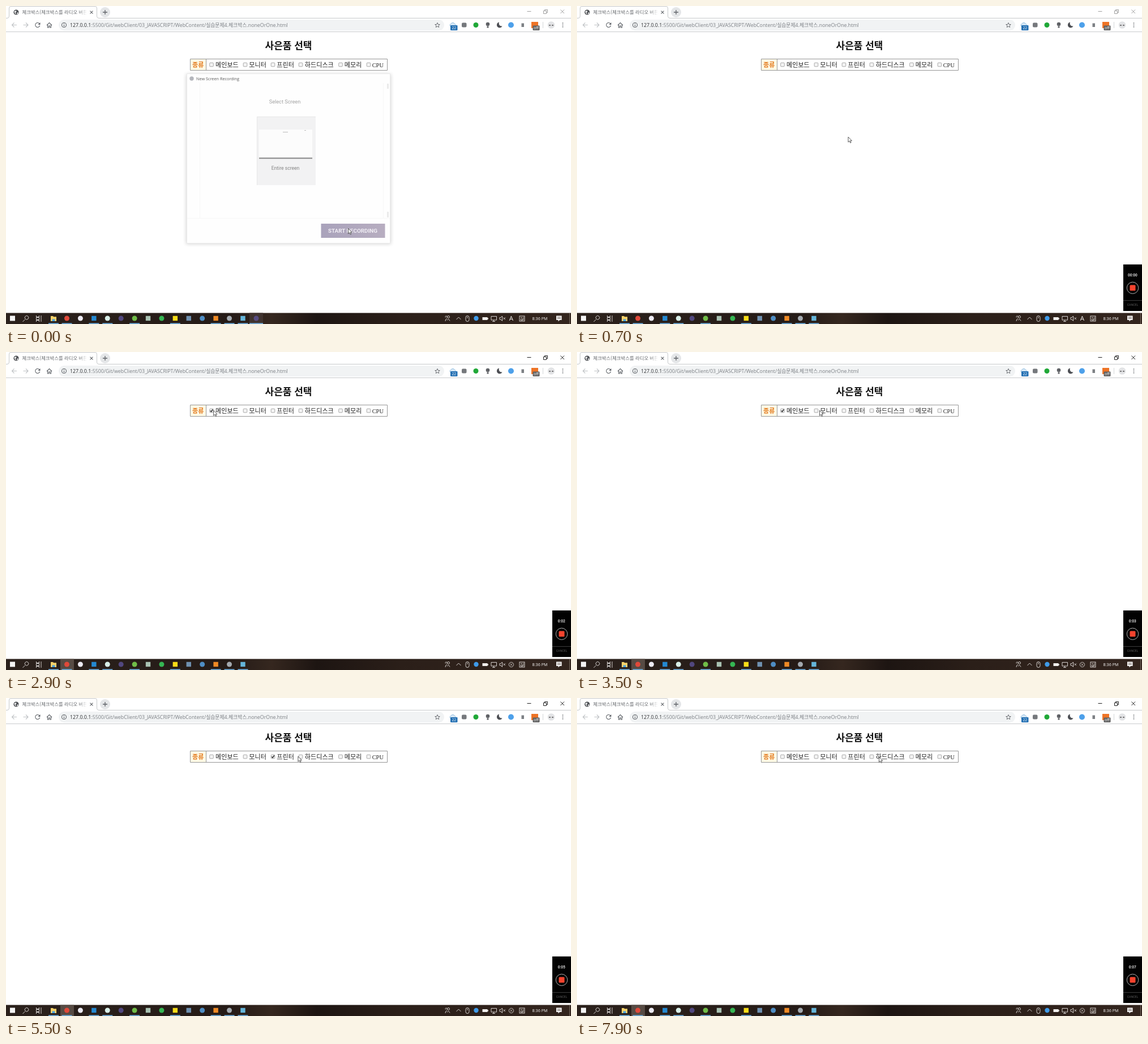
An HTML page for the animation above (8 s loop, 998 by 561 pixels).

```html
<!DOCTYPE html>
<html lang="ko">
<head>
<meta charset="utf-8">
<title>사은품 선택</title>
<style>
html, body { margin: 0; width: 100%; height: 100%; overflow: hidden; background: #fff; }
svg { display: block; width: 100vw; height: 100vh; }
text { font-family: 'Open Sans', 'Noto Sans CJK KR', 'Noto Sans CJK', sans-serif; white-space: pre; }
.ko { font-family: 'Noto Sans CJK KR', 'Noto Sans CJK', sans-serif; }
.ro { font-family: Roboto, sans-serif; }
.mid { text-anchor: middle; }
.ln { fill: none; stroke: #5f6368; stroke-width: 1.1; }
.tray { fill: none; stroke: #e6e3e0; stroke-width: .9; }
.win { fill: none; stroke: #a0a0a0; stroke-width: 1; }
.focus .win { stroke: #222; }
.focus .ime, .blur .no { display: none; }
.blur .active { display: none; }
</style>
</head>
<body>
<svg id="stage" class="blur" viewBox="0 0 998 561" preserveAspectRatio="none">
  <defs>
    <linearGradient id="bar">
      <stop offset="0" stop-color="#2b211c"/><stop offset=".4" stop-color="#251b17"/>
      <stop offset=".47" stop-color="#35271f"/><stop offset=".55" stop-color="#1d1512"/>
      <stop offset=".7" stop-color="#2b1f19"/><stop offset="1" stop-color="#33251e"/>
    </linearGradient>
    <linearGradient id="btn">
      <stop offset="0" stop-color="#a9a2bb"/><stop offset="1" stop-color="#b7adc0"/>
    </linearGradient>
    <linearGradient id="fade">
      <stop offset="0" stop-color="#fff" stop-opacity="0"/><stop offset="1" stop-color="#fff"/>
    </linearGradient>
    <clipPath id="tab"><path d="M27 3h116v16H27z"/></clipPath>
    <filter id="soft" x="-10%" y="-10%" width="120%" height="120%"><feGaussianBlur stdDeviation="3"/></filter>
  </defs>
  <rect width="998" height="561" fill="#fff"/>

  <!-- tab strip -->
  <path d="M0 21.5H2Q5.500 21.500 5.500 18V4Q5.500 .5 9 .5H157Q160.500 .5 160.500 4V18Q160.500 21.500 164 21.500H998" fill="none" stroke="#c6c8ca"/>
  <circle cx="18" cy="11" r="4.600" fill="#505357"/>
  <path d="M14.500 9.500l3-1.500 1 2-2 1 1 2-1 1.500zM19.500 12l2-1-.5 3-1.500.8z" fill="#fff"/>
  <g clip-path="url(#tab)"><text class="ko" x="28.500" y="13.700" font-size="8.400" fill="#66696d">체크박스(체크박스를 라디오 버튼</text></g>
  <rect x="128" y="4" width="15" height="14" fill="url(#fade)"/>
  <path class="ln" d="M148.500 8.700l5 5m0-5l-5 5"/>
  <circle cx="175" cy="11" r="9" fill="#e4e6e8"/>
  <path class="ln" d="M171 11h8m-4-4v8" style="stroke-width:1.300"/>
  <path class="win" d="M920.500 9.500h7"/>
  <path class="win" d="M949.500 8.500h5v5h-5zM951.500 8.500v-2h5v5h-2"/>
  <path class="win" d="M979.500 6.500l6.500 6.500m0-6.500l-6.500 6.500"/>

  <!-- toolbar -->
  <path d="M0 45.500H998" stroke="#c9cbcd"/>
  <rect x="93" y="24" width="681" height="19.500" rx="9.700" fill="#f1f3f4"/>
  <path class="ln" d="M19 33.500h-8.500m4-4l-4 4 4 4M30.500 33.500h8.500m-4-4l4 4-4 4" style="stroke:#bfc2c5"/>
  <path class="ln" d="M59.300 31.500a4 4 0 1 0 .4 3"/>
  <path d="M60.500 29v4h-4z" fill="#5f6368"/>
  <path class="ln" d="M72 34l4.500-4.500L81 34M73.500 33v5h2v-3h2v3h2v-5"/>
  <circle class="ln" cx="102.500" cy="33.500" r="4"/>
  <path class="ln" d="M102.500 33v3m0-5.200v1.100"/>
  <text x="113" y="37" font-size="8.820" fill="#7b7f84"><tspan fill="#2c2e31">127.0.0.1</tspan>:5500/Git/webClient/03_JAVASCRIPT/WebContent/실습문제4.체크박스.noneOrOne.html</text>
  <path class="ln" d="M762 29.500l1.200 2.900 3.100.2-2.400 2 .8 3-2.700-1.700-2.700 1.700.8-3-2.400-2 3.100-.2z" style="stroke-width:.9"/>
  <path d="M785 36a2.500 2.500 0 0 1 1-4.500 3.500 3.500 0 0 1 6.500 0 2.500 2.500 0 0 1 1 4.500z" fill="#d5e7f5" stroke="#8ab8dc" stroke-width=".8"/>
  <rect x="785" y="34" width="12.500" height="9" rx="1" fill="#2470b3"/>
  <text class="mid" x="791.200" y="41" font-size="6.600" fill="#fff">22</text>
  <rect x="805" y="29.500" width="8.500" height="8" rx="2" fill="#75787c"/>
  <circle cx="830" cy="33.500" r="4.500" fill="#20a838"/>
  <circle cx="851" cy="32" r="3.300" fill="#606266"/>
  <path d="M849.500 35.500h3v3h-3z" fill="#606266"/>
  <path d="M871 28.500a5 5 0 1 0 5.500 7 5 5 0 0 1-5.500-7z" fill="#4c4e53"/>
  <circle cx="892" cy="33.500" r="5" fill="#4da0ea"/>
  <rect x="910.500" y="30.500" width="4.500" height="6.500" fill="#7d8084"/>
  <rect x="928" y="28" width="12" height="11" fill="#ee7426"/>
  <rect x="930.500" y="34.500" width="12" height="8.500" rx="1" fill="#626262"/>
  <text class="mid" x="936.500" y="41.200" font-size="6.600" fill="#fff">off</text>
  <path d="M948.500 28v11" stroke="#d4d6d8"/>
  <circle cx="963" cy="33.500" r="6.300" fill="#e2e3e5"/>
  <path d="M959 34h3m2 0h3" stroke="#5a5a5a" stroke-width="1.600"/>
  <path d="M983.500 29.500v1.500m0 1.800v1.500m0 1.800v1.500" stroke="#5f6368" stroke-width="1.600"/>

  <!-- page -->
  <text class="ko mid" x="499" y="76.300" font-size="17" font-weight="700" fill="#111">사은품 선택</text>
  <rect x="325.500" y="93.500" width="28" height="20" fill="#fffbe6"/>
  <path d="M325.500 93.500H673.500V113.500H325.500zM353.500 93.500V113.500" fill="none" stroke="#969696"/>
  <text class="ko mid" x="339.200" y="107.700" font-size="11" font-weight="700" fill="#e2781a">종류</text>
  <g id="items"></g>

  <!-- recording dialog -->
  <g id="dialog">
    <rect x="318" y="120" width="362" height="300" fill="#000" opacity=".16" filter="url(#soft)"/>
    <rect x="319.500" y="119.500" width="359" height="299" fill="#fefefe" stroke="#eaeaea"/>
    <path d="M320 374.500H678M342.500 136V374M666.500 136V374" stroke="#f7f7f7"/>
    <path d="M674.500 137v9m0 217v10" stroke="#eaeaea" stroke-width="3"/>
    <circle cx="328" cy="128" r="3.700" fill="#b4b6bc"/>
    <text x="336" y="130.600" font-size="7.300" fill="#5a5a5a">New Screen Recording</text>
    <text class="ro mid" x="492.500" y="171.500" font-size="9.200" fill="#a2a2a2">Select Screen</text>
    <rect x="443" y="195" width="104" height="121" fill="#f2f2f3"/>
    <path d="M443.500 316V195.500H547" fill="none" stroke="#e6e6e7"/>
    <rect x="447" y="218" width="94" height="50" fill="#fcfcfc"/>
    <path d="M447 268.500h94" stroke="#858585" stroke-width="2.200"/>
    <path d="M489 222.500h9m29-3h3" stroke="#bbb"/>
    <text class="ro mid" x="493.500" y="289" font-size="8.600" fill="#858585">Entire screen</text>
    <rect x="556.500" y="384" width="113" height="25" fill="url(#btn)"/>
    <text class="ro mid" x="612.500" y="400" font-size="9.900" font-weight="700" fill="#f1eef5">START RECORDING</text>
  </g>

  <!-- recorder -->
  <g id="recorder">
    <rect x="964.500" y="455.500" width="34" height="83" fill="#000" opacity=".12"/>
    <rect x="965" y="456" width="33" height="82" fill="#020202"/>
    <text id="clock" class="ro mid" x="981.300" y="476.800" font-size="6.600" font-weight="500" fill="#fff"></text>
    <circle cx="981.500" cy="497.300" r="10.200" fill="none" stroke="#c4c4c4" stroke-width=".9"/>
    <rect x="976.500" y="492.300" width="10" height="10" rx="1.500" fill="#f4442e"/>
    <path d="M965 519.500h33" stroke="#3c3c3c"/>
    <text class="ro mid" x="981.500" y="529" font-size="5.200" fill="#5c5c5c">CANCEL</text>
  </g>

  <!-- taskbar -->
  <rect y="541.500" width="998" height="19.500" fill="url(#bar)"/>
  <rect class="active" x="96" y="541.500" width="24" height="19.500" fill="#574b44"/>
  <rect x="7" y="546.500" width="9" height="9" fill="#f4f4f4"/>
  <path class="tray" d="M33.500 553l-4 4M38.900 552.100a3.300 3.300 0 1 1 0-4.600 3.300 3.300 0 0 1 0 4.600"/>
  <path class="tray" d="M53.500 546v2.500h5V546M53.500 557v-2.500h5v2.500M53.500 549.500h5v4h-5zM62 546v11"/>
  <path d="M79 547h4l1 1.300h5V556H79z" fill="#f6d26b"/>
  <path d="M81.500 552.500h5V556h-5z" fill="#4aa3df"/>
  <g id="apps"></g>
  <g id="recApp">
    <rect x="430" y="541.500" width="24" height="19.500" fill="#40332f"/>
    <circle cx="442" cy="551" r="4.500" fill="#574c82"/>
    <path d="M430 560.200h24" stroke="#78b8ea" stroke-width="1.600"/>
  </g>

  <g class="tray">
    <circle cx="781.500" cy="548.500" r="2"/>
    <path d="M776 556q0-4 3-4.500M779 554.500q3-4 5 1M776.500 549.500a1.500 1.500 0 1 1 2 0"/>
    <path d="M795.500 553l4-4 4 4"/>
    <rect x="812" y="546.500" width="6" height="10" rx="3"/><path d="M815 548v3"/>
    <path d="M857 547.500h9.500v6.500H857zM861.500 554v2.500M859 556.500h5"/>
    <path d="M872 549.500h2l2.500-2.500v8.500L874 553h-2zM878.500 549.500l3.500 3.500m0-3.500l-3.500 3.500"/>
    <rect x="907" y="547" width="9" height="9"/>
    <path d="M909 549.500h3m2-1v6M909.500 552h3v2.500h-3z" stroke-width=".8"/>
    <g class="no" stroke="#cfcac7"><circle cx="892.500" cy="551.500" r="4.200"/><path d="M890.500 549.500l4 4m0-4l-4 4"/></g>
  </g>
  <circle cx="830.500" cy="551" r="4.200" fill="#3f9bea"/>
  <path d="M841.500 549h9v5h-9zM850.500 550.500h1.500v2h-1.500z" fill="#f2f0ee"/>
  <text class="ime mid" x="892.300" y="555.300" font-size="11.500" fill="#f4f2f0">A</text>
  <text class="mid" x="943" y="554.200" font-size="7.200" fill="#fff">8:36 PM</text>
  <path d="M972 546.500h9.500v7.500h-3.500l-2.500 2.500V554H972z" fill="#fff"/>
  <path d="M973.500 549h6.500m-6.500 2.300h6.500" stroke="#3a2c25" stroke-width=".8"/>
  <path d="M995.500 542v19" stroke="#75695f"/>

  <path id="cursor" d="M0 0V9.200L2.200 7.200 3.700 10.500 5.200 9.800 3.700 6.700H6.500z" fill="#fff" stroke="#333" stroke-width=".8"/>
</svg>
<script>
const LOOP = 8000, STEP = 100, FOCUS = 2700;
const $ = id => document.getElementById(id);

// label, box centre, label start
const items = [
  ['메인보드', 363, 370], ['모니터', 422.5, 429.3], ['프린터', 471.5, 478.3],
  ['하드디스크', 520.5, 527.8], ['메모리', 591, 597.8], ['CPU', 640.5, 646.7]
];
$('items').innerHTML = items.map(([label, box, x]) => {
  const font = label === 'CPU'
    ? 'font-size="10.4" style="font-family:\'Liberation Serif\',serif"'
    : 'class="ko" font-size="11.1"';
  return `<rect x="${box - 3.3}" y="100.2" width="6.6" height="6.6" rx="1" fill="#f3f3f3" stroke="#a0a0a0" stroke-width=".9"/>
    <path class="tick" d="M${box - 2.2} 103.400l1.700 1.900 2.900-4" fill="none" stroke="#333" stroke-width="1.500"/>
    <text ${font} x="${x}" y="107.8" fill="#222">${label}</text>`;
}).join('');

// colour, shape (c: circle, s: square), running
const apps = [
  ['#e0493a', 'c', 1], ['#eceaf4', 'c', 0], ['#2489d2', 's', 1], ['#d8efe8', 'c', 1],
  ['#51477f', 'c', 0], ['#70bd48', 'c', 1], ['#a9c2b2', 's', 0], ['#35b653', 'c', 0],
  ['#f8dc18', 's', 1], ['#6f90b0', 's', 0], ['#4f8dc4', 'c', 0], ['#f08a25', 's', 1],
  ['#a3a9af', 'c', 1], ['#65b5da', 's', 1]
];
const underline = x => `<path d="M${x - 9} 560.2h18" stroke="#6caee0" stroke-width="1.600"/>`;
$('apps').innerHTML = underline(84) + apps.map(([fill, shape, open], i) => {
  const x = 107.5 + i * 23.92;
  const mark = shape === 'c'
    ? `<circle cx="${x}" cy="551" r="4.500" fill="${fill}"/>`
    : `<rect x="${x - 4.2}" y="546.800" width="8.400" height="8.400" fill="${fill}"/>`;
  return mark + (open ? underline(x) : '');
}).join('');

// time, x, y of the pointer tip
const path = [
  [0, 604.5, 392.5], [100, 604.5, 392.5], [700, 479, 231], [900, 465, 214], [1000, 462, 210],
  [1700, 434, 180], [1900, 431, 175], [2000, 425.5, 167.5], [2500, 363, 103], [2800, 363, 103],
  [3500, 428.5, 103], [3600, 423, 103], [3900, 423, 103], [4600, 479.5, 106], [4800, 472, 103],
  [5100, 472, 103], [5600, 521, 103], [6100, 521, 103], [6400, 540, 99], [6900, 522, 103],
  [7400, 522, 103], [7900, 533.5, 104]
];
// time, checked item
const checks = [[0, -1], [2700, 0], [3700, 1], [4900, 2], [5700, 3], [7200, -1]];

const ease = u => u * u * (3 - 2 * u);
function pointer(t) {
  const i = path.findIndex(p => p[0] > t);
  if (i < 0) return path[path.length - 1].slice(1);
  const [t0, x0, y0] = path[i - 1], [t1, x1, y1] = path[i];
  const u = ease((t - t0) / (t1 - t0));
  return [x0 + (x1 - x0) * u, y0 + (y1 - y0) * u];
}

const ticks = document.querySelectorAll('.tick');
const show = (el, on) => el.setAttribute('visibility', on ? 'visible' : 'hidden');

function draw(now) {
  const t = Math.floor((now % LOOP) / STEP) * STEP;
  const checked = checks.filter(c => c[0] <= t).pop()[1];
  ticks.forEach((el, i) => show(el, i === checked));
  $('cursor').setAttribute('transform', `translate(${pointer(t)})`);
  $('dialog').setAttribute('opacity', Math.max(0, 1 - t / 200));
  show($('recApp'), t < 300);
  show($('recorder'), t >= 400);
  const sec = Math.max(0, Math.floor((t - 450) / 1000));
  $('clock').textContent = sec ? '0:0' + sec : '00:00';
  $('stage').setAttribute('class', t >= FOCUS ? 'focus' : 'blur');
}

const start = performance.now();
function loop() {
  draw(performance.now() - start);
  requestAnimationFrame(loop);
}
loop();
</script>
</body>
</html>
```
